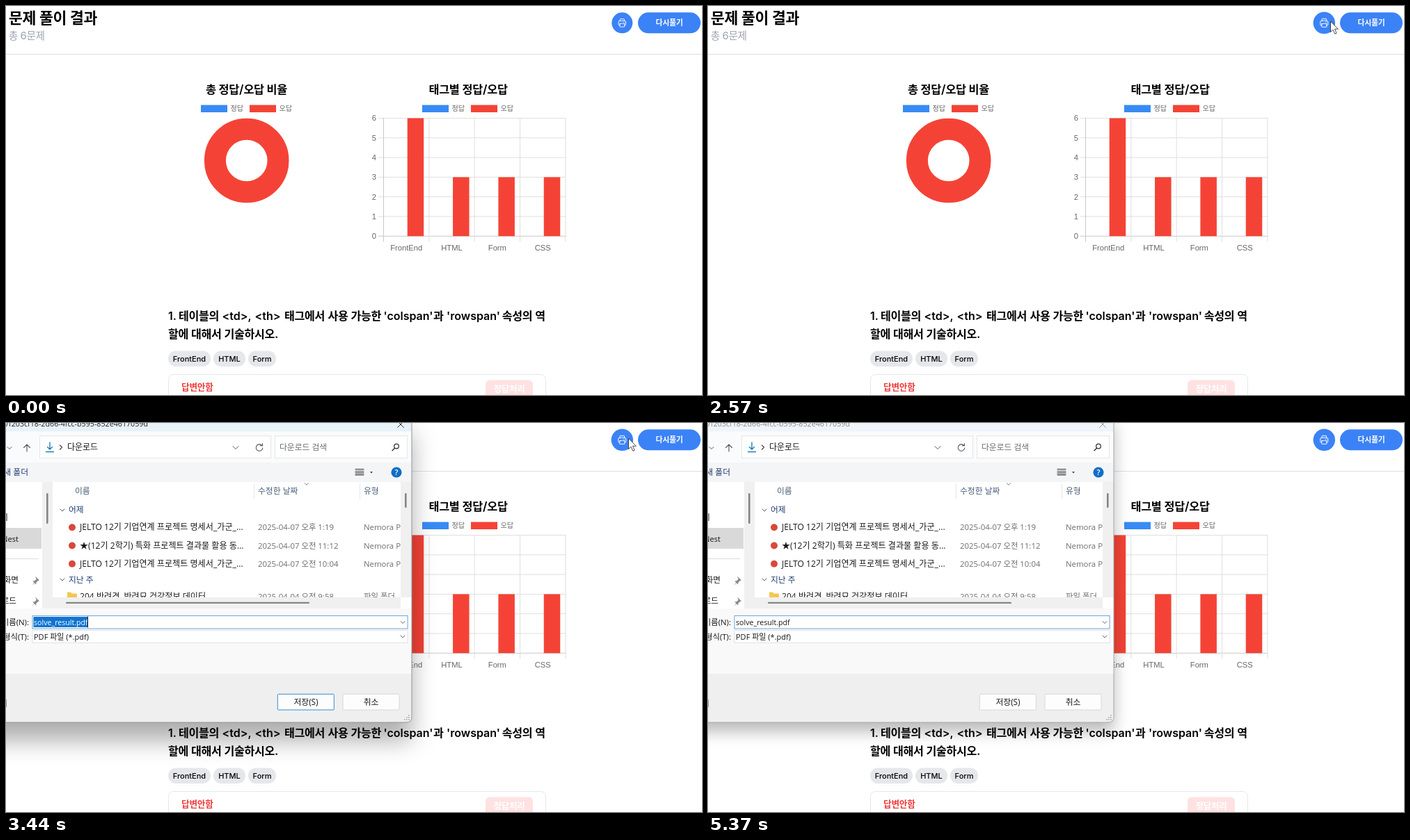
An HTML page for the animation above (5430 ms loop, 1000x560 px).

```html
<!DOCTYPE html>
<html lang="ko">
<head>
<meta charset="utf-8">
<title>문제 풀이 결과</title>
<style>
html, body { margin: 0; width: 100%; height: 100%; overflow: hidden; background: #fff; }
svg { display: block; width: 100%; height: 100%; }
.page { font-family: Inter, 'Noto Sans CJK KR', sans-serif; fill: #000; }
.page .k { font-size: .96em; letter-spacing: -.02em; }
.chart { font-family: 'Liberation Sans', 'Noto Sans CJK KR', sans-serif; fill: #666; }
.win { font-family: 'Open Sans', 'Noto Sans CJK KR', sans-serif; fill: #1a1a1a; }
.b { font-weight: 600; }
.mid { text-anchor: middle; }
.end { text-anchor: end; }
.line { fill: none; stroke-linecap: round; stroke-linejoin: round; }
</style>
</head>
<body>
<svg id="stage" viewBox="0 0 1000 560"></svg>
<script>
const LOOP = 5430;
const BLUE = '#3b82f6', RED = '#f44336';

// ---------- markup helpers ----------
const esc = s => s.replace(/&/g, '&amp;').replace(/</g, '&lt;').replace(/>/g, '&gt;');
const kor = s => esc(s).replace(/[가-힣]+/g, m => `<tspan class="k">${m}</tspan>`);
const text = (x, y, s, size, attrs = '') =>
  `<text x="${x}" y="${y}" font-size="${size}" ${attrs}>${kor(s)}</text>`;
const words = (y, size, attrs, list) => list.map(([x, s]) => text(x, y, s, size, attrs)).join('');
const rect = (x, y, w, h, fill, attrs = '') =>
  `<rect x="${x}" y="${y}" width="${w}" height="${h}" fill="${fill}" ${attrs}/>`;
const line = (d, color, width = 1, attrs = '') =>
  `<path class="line" d="${d}" stroke="${color}" stroke-width="${width}" ${attrs}/>`;
const chevron = (x, y, color = '#666', r = 3) =>
  line(`M${x - r} ${y - r / 2}l${r} ${r}l${r} ${-r}`, color);
const range = n => [...Array(n).keys()];

// ---------- result page ----------
const legend = x =>
  rect(x, 142.5, 38, 10.5, '#388bf6') + text(x + 42.5, 150.5, '정답', 10.6) +
  rect(x + 70, 142.5, 38, 10.5, RED) + text(x + 112.5, 150.5, '오답', 10.6);

function barChart() {
  const x0 = 542.5, y0 = 331.3, dx = 65.35, dy = 28.3;
  const tags = [['FrontEnd', 6], ['HTML', 3], ['Form', 3], ['CSS', 3]];
  const rows = range(7).map(i => {
    const y = y0 - i * dy;
    return line(`M535 ${y}H804`, i ? '#dfdfdf' : '#c8c8c8') +
      text(532, y + 3.8, String(i), 11.2, 'class="end"');
  });
  const cols = range(5).map(i => line(`M${x0 + i * dx} 161.5V339`, i ? '#dfdfdf' : '#c8c8c8'));
  const bars = tags.map(([name, n], i) =>
    rect(x0 + 34.2 + i * dx, y0 - n * dy, 23.5, n * dy, RED) +
    text(x0 + (i + .5) * dx, 352, name, 11.2, 'class="mid"'));
  return [...rows, ...cols, ...bars].join('');
}

const pill = (x, w, s) =>
  rect(x, 496.5, w, 22.5, '#e5e7eb', 'rx="11.2"') +
  text(x + w / 2, 511.7, s, 11, 'class="mid" font-weight="500"');

const printer = `<g class="line" stroke="#fff" stroke-width="1.6" transform="translate(878.3 17.3) scale(.583)">
  <path d="M6.7 7V3.4q0-1.1 1.1-1.1h8.4q1.1 0 1.1 1.1V7M6.3 18H5.2Q3 18 3 15.8V9.5Q3 7.6 4.8 7.3Q12 6.2 19.2 7.3Q21 7.6 21 9.5v6.3Q21 18 18.8 18h-1.1"/>
  <path d="M6 13.9q6-.8 12 0M6.7 13.8L6.1 20.6q0 1.2 1.1 1.2h9.6q1.1 0 1.1-1.2l-.6-6.8M15 10.5h.1M18 10.5h.1"/></g>`;

const page = `<g class="page">
  ${words(24.5, 22.5, 'class="b"', [[4, '문제'], [48, '풀이'], [92, '결과']])}
  ${words(48.2, 15, 'fill="#9ca3af"', [[4, '총'], [20.5, '6문제']])}
  ${line('M0 69.5H1000', '#dedfe3')}
  ${words(126, 17, 'class="b"', [[287, '총'], [305.6, '정답/오답'], [374.5, '비율'], [607.5, '태그별'], [655.5, '정답/오답']])}
  <g class="chart">${legend(280)}${legend(598)}${barChart()}</g>
  <circle cx="345.7" cy="222.5" r="45.3" fill="none" stroke="${RED}" stroke-width="31"/>
  ${words(451.5, 16.8, 'class="b"', [[248, '테이블의'], [400, '태그에서'], [462.5, '사용'], [495.5, '가능한'],
    [614, '과'], [712.7, '속성의'], [760.3, '역']])}
  ${words(451.5, 16, 'class="b"', [[233, '1.'], [310.5, '<td>,'], [357.5, '<th>'], [542.5, "'colspan'"], [633, "'rowspan'"]])}
  ${words(477.5, 16.8, 'class="b"', [[233, '할에'], [266, '대해서'], [313.5, '기술하시오.']])}
  ${pill(233, 61, 'FrontEnd')}${pill(298, 46, 'HTML')}${pill(348, 40, 'Form')}
  ${rect(233.5, 530.5, 542, 80, '#fff', 'rx="7" stroke="#e5e7eb"')}
  ${text(252, 552.5, '답변안함', 13.2, 'class="b" fill="#ef3b3b"')}
  ${rect(689, 538.5, 68, 30, '#fee2e2', 'rx="6"')}
  ${text(723, 556.3, '정답처리', 13, 'class="b mid" fill="#fff"')}
  <g id="print"><circle cx="885.3" cy="24.3" r="15" fill="${BLUE}"/>${printer}</g>
  <g id="retry">${rect(908, 9.3, 90, 30, BLUE, 'rx="15"')}
    ${text(953, 28.2, '다시풀기', 11.3, 'class="b mid" fill="#fff"')}</g>
</g>`;

// ---------- save dialog ----------
const pin = y => `<path d="M0-6l6 6l-2 .5l-2.5 2.5l-.3 3l-2.2-2.2l-4 3.4l3.4-4l-2.2-2.2l3-.3l2.5-2.5z" fill="#888" transform="translate(42 ${y})"/>`;
const GRAY = 'fill="#6d6d6d"', HEAD = 'fill="#475d78"', GROUP = 'fill="#1f3a70"';

const fileRow = (y, name, date, type, icon) =>
  icon + text(106, y, name, 12.1) + text(362, y, date, 11.4, GRAY) + text(514, y, type, 11.4, GRAY);
const pdfRow = (y, name, date) =>
  fileRow(y, name, date, 'Nemora PDF 문서', `<circle cx="95" cy="${y - 4}" r="5" fill="#d9483b"/>`);
const folder = '<path d="M88 244.5q0-1 1-1h4l1.5 2h6.5q1 0 1 1v8h-14z" fill="#f6c650"/>';

const files = `<g id="files" clip-path="url(#list)">
  ${chevron(81, 125.5, '#46598a')}${text(90, 129.3, '어제', 11.8, GROUP)}
  ${pdfRow(154.3, 'JELTO 12기 기업연계 프로젝트 명세서_가군_...', '2025-04-07 오후 1:19')}
  ${pdfRow(180.5, '★(12기 2학기) 특화 프로젝트 결과물 활용 동...', '2025-04-07 오전 11:12')}
  ${pdfRow(206.7, 'JELTO 12기 기업연계 프로젝트 명세서_가군_...', '2025-04-07 오전 10:04')}
  ${chevron(81, 225.5, '#46598a')}${text(90, 229.6, '지난 주', 11.8, GROUP)}
  ${fileRow(254, '204.반려견, 반려묘 건강정보 데이터', '2025-04-04 오전 9:58', '파일 폴더', folder)}
</g>`;

const address = `<g id="address">
  ${chevron(5, 36, '#555')}
  ${line('M63 28v10m-3.5-3.5l3.5 3.5l3.5-3.5M57.5 41.5h11', '#1c7fb5', 1.4)}
  ${line('M77.5 32l3 3l-3 3', '#444', 1.2)}
  ${text(88, 39.2, '다운로드', 12)}
  ${chevron(330, 35.5, '#555', 4)}
  ${line('M367.8 32.5a4.8 4.8 0 1 0 1 3.5M368.5 29.5v3.2h-3.2', '#555', 1.1)}
  ${text(393, 39.2, '다운로드 검색', 11.8, GRAY)}
  <circle class="line" cx="561" cy="33.5" r="3.3" stroke="#333" stroke-width="1.3"/>
  ${line('M558.5 36.2l-3.5 3.5', '#333', 1.4)}
</g>`;

const tools = `<g id="tools">
  ${text(32, 75, '새 폴더', 11.8, 'class="end" ' + GROUP)}
  ${line('M502 66.5h12m-12 2.7h12m-12 2.7h12m-12 2.7h12', '#333', 1.1)}
  <path d="M523 70h4l-2 2.5z" fill="#444"/></g>`;

const grip = [[2, 0], [1, 1], [2, 1], [0, 2], [1, 2], [2, 2]]
  .map(([a, b]) => rect(572 + a * 3, 420 + b * 3, 1.6, 1.6, '#aaa')).join('');

const frame = 'M-200 -12H575Q583 -12 583 -4V423Q583 431 575 431H-200Z';
const dialog = `<g id="dialog" class="win">
  <path id="shade" d="${frame}" fill="#f9f9f9"/>
  <g clip-path="url(#frame)">
    <rect id="bar" x="-200" y="-12" width="790" height="24"/>
    ${text(204, 5.3, 'file:///f203cf18-2d66-4fcc-b595-852e4617059d', 10.7, 'id="caption" class="end"')}
    <path id="close" class="line" d="M562.5 -2.5l9 9m0-9l-9 9"/>
    ${rect(-200, 12, 790, 45, '#fafbfc')}
    ${rect(48.5, 18.5, 332, 32, '#fff', 'stroke="#e6e6e6"')}
    ${rect(386.5, 18.5, 190, 32, '#fff', 'stroke="#e6e6e6"')}
    ${line('M30 41V31m-4.5 4.5l4.5-4.5l4.5 4.5', '#555', 1.1)}
    ${address}
    <path id="crumb" class="line" d="M139.5 32l3 3l-3 3" stroke="#444" stroke-width="1.2"/>
    ${rect(-200, 57, 790, 28, '#f4f5f7')}
    ${tools}
    <circle cx="561" cy="71" r="7.6" fill="#0f6fc5"/>
    ${text(561, 75, '?', 11, 'class="b mid" fill="#fff"')}

    ${rect(-200, 85, 790, 182, '#fff')}
    ${rect(-200, 151, 251, 30, '#d9d9d9')}
    ${rect(52, 85, 15, 182, '#f0f0f0')}${rect(58, 101, 2.6, 44, '#858585', 'rx="1.3"')}
    ${text(3, 140, '갤러리', 11.4, 'class="end"')}
    ${text(18, 170.5, 'FileNest', 11.2, 'class="end"')}
    ${line('M-200 195.5H46', '#dcdcdc')}
    ${text(18, 230, '바탕 화면', 11.6, 'class="end"')}${pin(226.5)}
    ${text(15, 260, '다운로드', 11.6, 'class="end"')}${pin(256.5)}

    ${words(101.7, 11.8, HEAD, [[99, '이름'], [362, '수정한 날짜'], [514, '유형']])}
    ${line('M356.5 87v22M508.5 87v22', '#e6e6e6')}${chevron(432, 88, '#777', 2.6)}
    ${text(304, 135.2, '작업 중...', 11.6, 'id="busy" ' + GRAY)}
    ${files}
    ${rect(567, 85, 16, 166, '#f0f0f0')}${rect(573, 101, 2.6, 21, '#858585', 'rx="1.3"')}
    ${rect(67, 251, 500, 16, '#f0f0f0')}${rect(86, 257.7, 350, 2.4, '#858585', 'rx="1.2"')}

    ${text(33, 291, '파일 이름(N):', 11.4, 'class="end"')}
    ${text(33, 311.5, '파일 형식(T):', 11.4, 'class="end"')}
    ${rect(38, 277.5, 539, 18.5, '#fff', 'stroke="#6aa5da"')}
    ${rect(38, 298.5, 539, 18, '#fff', 'stroke="#e2e2e2"')}
    ${rect(39.5, 279, 78, 15, '#0f74d1', 'id="mark"')}
    ${text(40, 290.7, 'solve_result.pdf', 10.6, 'id="name"')}
    ${rect(117, 278.5, 1, 16, '#222', 'id="caret"')}
    ${text(40, 311.5, 'PDF 파일 (*.pdf)', 11)}
    ${chevron(570, 287)}${chevron(570, 307.5)}

    ${rect(-200, 361, 790, 80, '#efefef')}
    ${text(2, 408, '폴더 숨기기', 11.6, 'class="end"')}
    ${rect(390.3, 390.3, 81, 22.7, '#fdfdfd', 'id="save" rx="1"')}
    ${rect(484, 390.3, 81, 22.7, '#fdfdfd', 'rx="1" stroke="#d8d8d8"')}
    ${text(431, 406, '저장(S)', 11.8, 'class="mid"')}${text(524.5, 406, '취소', 11.8, 'class="mid"')}
    ${grip}
  </g>
  <path id="edge" class="line" d="${frame}"/>
</g>`;

// ---------- pointer ----------
const pointer = `<circle id="click" cx="893.8" cy="21.5" r="11.3" fill="#ff0" opacity=".47"/>
<g id="pointer" fill="#fff" stroke="#222" stroke-linejoin="round">
  <path id="arrow" stroke-width=".8" d="M0 0V15.5L3.6 12.2L6.2 18.2L8.6 17.2L6 11.2H10.8Z"/>
  <path id="hand" d="M-2 1Q-2-1 0-1Q2-1 2 1V7Q4 6 4.6 7.6Q6.4 7 7 8.6Q9 8.4 9 10.5V15Q9 18 7 20.5H-1.5Q-2 18.5-4.5 15.5L-6.5 12Q-7 9.8-5 10Q-3.5 10.5-2 12.5Z"/>
</g>`;

const stage = document.getElementById('stage');
stage.innerHTML = `<defs>
  <clipPath id="frame"><path d="${frame}"/></clipPath>
  <clipPath id="list"><rect x="67" y="85" width="500" height="166"/></clipPath>
</defs>${page}${dialog}${pointer}`;

// ---------- animation ----------
const $ = id => document.getElementById(id);
const show = (id, on) => $(id).setAttribute('visibility', on ? 'inherit' : 'hidden');
const set = (id, attrs) => { for (const k in attrs) $(id).setAttribute(k, attrs[k]); };
const ease = p => { p = Math.min(1, Math.max(0, p)); return p * p * (3 - 2 * p); };
const zoom = (cx, cy, s) => `translate(${cx} ${cy}) scale(${s}) translate(${-cx} ${-cy})`;
const shadow = (dy, blur, alpha) => `drop-shadow(0 ${dy}px ${blur}px rgba(0,0,0,${alpha}))`;

const route = [[490, 958, 538], [690, 928, 44], [770, 917, 18], [1010, 894.5, 22],
  [3990, 894.5, 22], [4240, 976.5, 504], [4470, 975, 562]];

function pointerAt(t) {
  const i = Math.max(1, route.findIndex(k => k[0] >= t));
  const [a, b] = [route[i - 1], route[i]];
  const p = ease((t - a[0]) / (b[0] - a[0]));
  return [a[1] + (b[1] - a[1]) * p, a[2] + (b[2] - a[2]) * p];
}

function drawDialog(t) {
  set('dialog', { visibility: t >= 3200 ? 'visible' : 'hidden' });
  if (t < 3200) return;
  const q = Math.floor((t - 3200) / 40) * 40;
  const s = q >= 240 ? 1 : 1 - Math.min(.1, .075 * Math.exp((40 - q) / 52));
  const active = t < 5370;
  set('dialog', { transform: zoom(185, 178, s), opacity: Math.min(1, .2 + q / 40 * .39) });
  $('shade').style.filter = active ? shadow(26, 17, .32) : shadow(13, 11, .28);
  set('bar', { fill: active ? '#e8f2f9' : '#eff5fa' });
  set('caption', { fill: active ? '#222' : '#8c8c8c' });
  set('close', { stroke: active ? '#333' : '#999' });
  set('edge', { stroke: active ? '#8f9599' : '#a8a8a8' });
  set('save', { stroke: active ? '#3a8cce' : '#d8d8d8' });
  set('name', { fill: active ? '#fff' : '#1a1a1a' });
  show('mark', active);
  show('address', t >= 3280);
  show('crumb', t >= 3650 && active);
  show('busy', t < 3400);
  show('files', t >= 3400);
  show('tools', t >= 3400);
  show('caret', t < 3770 || (t >= 4290 && t < 4810));
}

function render(t) {
  const retry = ease((t - 710) / 150) - ease((t - 920) / 150);
  set('retry', { transform: zoom(953, 24.3, 1 + .05 * retry) });
  set('print', { transform: zoom(885.3, 24.3, 1 + .05 * ease((t - 920) / 150)) });
  drawDialog(t);

  const [x, y] = pointerAt(Math.min(4470, Math.max(490, t)));
  const hand = t >= 700 && t < 2570;
  set('pointer', { transform: `translate(${x} ${y})`, visibility: t >= 490 && t < 4470 ? 'visible' : 'hidden' });
  show('hand', hand);
  show('arrow', !hand);
  show('click', t >= 1470 && t < 1630);
}

const start = performance.now();
function tick() {
  render((performance.now() - start) % LOOP);
  requestAnimationFrame(tick);
}
render(0);
requestAnimationFrame(tick);
</script>
</body>
</html>
```
